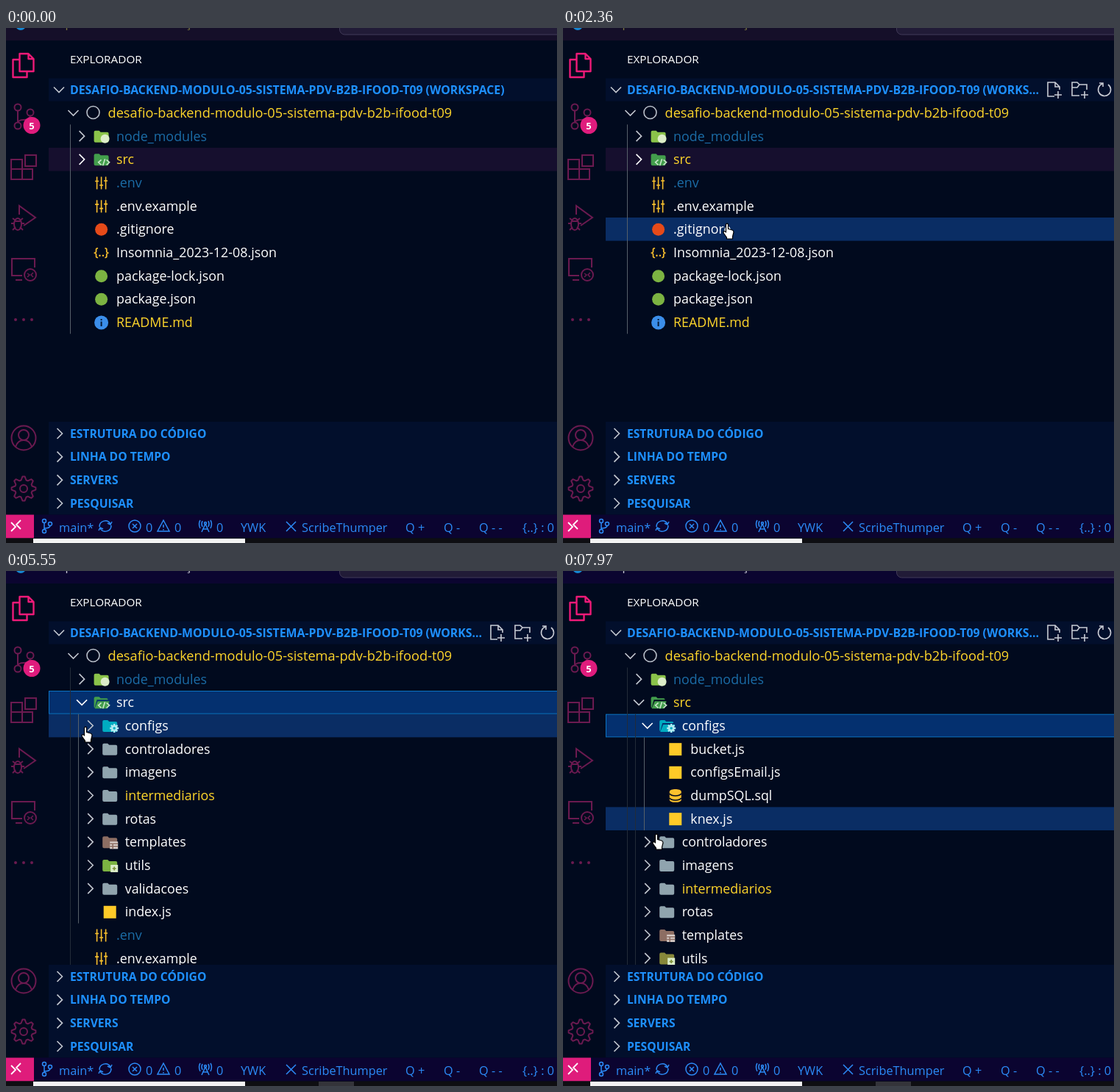
Recreate the animation shown at these times as an HTML page. Size 749 px wide and 701 px high, loop 8 s.

```html
<!DOCTYPE html>
<html lang="pt">
<head>
<meta charset="utf-8">
<title>Explorador</title>
<style>
html, body { margin: 0; width: 100%; height: 100%; overflow: hidden; background: #010a1e; }
svg { display: block; width: 749px; height: 701px; font-family: "Open Sans", "Noto Sans", sans-serif; }
text { white-space: pre; }
.row { font-size: 17.85px; fill: #fff; }
.root { font-size: 18.2px; }
.head { font-size: 15.65px; font-weight: 700; fill: #1e90ff; }
#title { font-size: 15.85px; }
.status { font-size: 16.3px; fill: #2c8cf8; }
.line { fill: none; stroke-width: 1.6; }
.dim { stroke: #6b1a50; stroke-width: 2; fill: none; }
.blue { stroke: #2c8cf8; fill: none; stroke-width: 1.5; }
</style>
</head>
<body>
<svg id="stage" viewBox="0 0 749 701"></svg>
<script>
const LOOP = 8000, TOP = 99.7, ROW = 31.66;
const WHITE = '#fff', YELLOW = '#ffd62b', MUTED = '#1b6ca6', AMBER = '#fbc12d';

const path = (d, attrs = '') => `<path d="${d}" ${attrs}/>`;
const text = (x, y, s, attrs) => `<text x="${x}" y="${y}" ${attrs}>${s}</text>`;
const rect = (x, y, w, h, fill, more = '') => `<rect x="${x}" y="${y}" width="${w}" height="${h}" fill="${fill}" ${more}/>`;
const disc = (x, y, r, attrs) => `<circle cx="${x}" cy="${y}" r="${r}" ${attrs}/>`;
const at = (x, y, body, attrs = '') => `<g transform="translate(${x} ${y})" ${attrs}>${body}</g>`;
const chevron = (x, y, open, color = '#c3c8d0') =>
  at(x, y, path(open ? 'M-7-3.5 0 3.5 7-3.5' : 'M-3.5-7 3.5 0-3.5 7', `class="line" stroke="${color}"`));

// n spokes around the centre, used by gears
const spokes = (n, r1, r2) => Array.from({ length: n }, (_, i) => {
  const a = i * 2 * Math.PI / n, c = Math.cos(a), s = Math.sin(a);
  return `M${(r1 * c).toFixed(1)} ${(r1 * s).toFixed(1)}L${(r2 * c).toFixed(1)} ${(r2 * s).toFixed(1)}`;
}).join('');

const folder = (color, open, mark = '') =>
  path(open ? 'M-10-6q0-2 2-2h5l2 2h8q2 0 2 2H-6L-9 7Q-10 7-10 5ZM-5-2H11L8 8H-9Z'
            : 'M-10-6q0-2 2-2h5l2 2h9q2 0 2 2V6q0 2-2 2H-8q-2 0-2-2Z', `fill="${color}"`) + mark;
const code = path('M0 0l-4 3.5 4 3.5M7 0l4 3.5-4 3.5M5-1l-3 9', 'class="line" stroke="#c8e6c9"');
const gear = at(6, 3, path(spokes(8, 3, 6), 'class="line" stroke="#b2ebf2" style="stroke-width:2.5"') +
  disc(0, 0, 3, 'fill="none" stroke="#b2ebf2" stroke-width="2.5"'));
const grid = rect(0, -1, 11, 10, '#d7ccc8') + path('M0 2H11M0 5.5H11M4 2V9', 'class="line" stroke="#8d6e63"');
const plus = rect(1, -1, 10, 10, '#dcedc8') + path('M6 1.5V6.5M3.5 4H8.5', 'class="line" stroke="#7c8f38"');

const icons = {
  modules: folder('#8bc34a', false, disc(5, 3, 6, 'fill="#dcedc8"')),
  src: folder('#439e4c', false, code),
  srcOpen: folder('#439e4c', true, code),
  configs: folder('#00acc1', false, gear),
  configsOpen: folder('#00acc1', true, gear),
  plain: folder('#90a4ae'),
  templates: folder('#8d6e63', false, grid),
  utils: folder('#7cb342', false, plus),
  utilsDull: folder('#87883a', false, plus),
  env: path('M-6-8.5V8.5M0-8.5V8.5M6-8.5V8.5M-8.5-2.5H-3.5M-2.5 3H2.5M3.5-3H8.5', `class="line" stroke="${AMBER}"`),
  git: disc(0, 0, 8.5, 'fill="#e64a19"'),
  json: text(0, 5, '{..}', `text-anchor="middle" font-size="16" font-weight="600" fill="${AMBER}"`),
  pkg: disc(0, 0, 8.5, 'fill="#7cb342"'),
  info: disc(0, 0, 9.5, 'fill="#3b8eea"') + path('M0-1.5V5M0-5V-3', 'stroke="#061a36" stroke-width="2"'),
  js: rect(-8.5, -8.5, 17, 17, '#ffca28'),
  sql: path('M-8-5.5C-8-10 8-10 8-5.5V5.5C8 10-8 10-8 5.5Z', `fill="${AMBER}"`) +
    path('M-8-3C-5 1 5 1 8-3M-8 3C-5 7 5 7 8 3', 'class="line" stroke="#010a1e"')
};

// entry: depth, icon, label, colour, chevron (0 none, 1 closed, 2 open)
const root = [0, '', 'desafio-backend-modulo-05-sistema-pdv-b2b-ifood-t09', YELLOW, 2];
const modules = [1, 'modules', 'node_modules', MUTED, 1];
const envs = [[1, 'env', '.env', MUTED, 0], [1, 'env', '.env.example', WHITE, 0]];
const dirs = utils => [
  [2, 'plain', 'controladores', WHITE, 1], [2, 'plain', 'imagens', WHITE, 1],
  [2, 'plain', 'intermediarios', YELLOW, 1], [2, 'plain', 'rotas', WHITE, 1],
  [2, 'templates', 'templates', WHITE, 1], [2, utils, 'utils', WHITE, 1]];
const trees = [
  { sel: 2, guides: [[87.5, 1, 10, '#566069']], rows: [
    root, modules, [1, 'src', 'src', YELLOW, 1], ...envs,
    [1, 'git', '.gitignore', WHITE, 0], [1, 'json', 'Insomnia_2023-12-08.json', WHITE, 0],
    [1, 'pkg', 'package-lock.json', WHITE, 0], [1, 'pkg', 'package.json', WHITE, 0],
    [1, 'info', 'README.md', YELLOW, 0]] },
  { sel: 2, guides: [[87.5, 1, 14, '#222b38'], [98.5, 3, 12, '#566069']], rows: [
    root, modules, [1, 'srcOpen', 'src', WHITE, 2], [2, 'configs', 'configs', WHITE, 1],
    ...dirs('utils'), [2, 'plain', 'validacoes', WHITE, 1], [2, 'js', 'index.js', WHITE, 0], ...envs] },
  { sel: 3, guides: [[87.5, 1, 14, '#222b38'], [98.5, 3, 14, '#222b38'], [110.5, 4, 8, '#566069']], rows: [
    root, modules, [1, 'srcOpen', 'src', YELLOW, 2], [2, 'configsOpen', 'configs', WHITE, 2],
    [3, 'js', 'bucket.js', WHITE, 0], [3, 'js', 'configsEmail.js', WHITE, 0],
    [3, 'sql', 'dumpSQL.sql', WHITE, 0], [3, 'js', 'knex.js', WHITE, 0], ...dirs('utilsDull')] }
];

function drawTree(tree, n) {
  const selY = TOP + tree.sel * ROW;
  const select = n ? rect(58.5, selY + .5, 700, ROW - 1, '#04306f', 'stroke="#0b74c4"')
                   : rect(58, selY, 691, ROW, '#160f2e');
  const guides = tree.guides.map(([x, a, b, c]) =>
    path(`M${x} ${TOP + a * ROW}V${TOP + b * ROW}`, `stroke="${c}"`)).join('');
  const rows = tree.rows.map(([depth, icon, label, color, arrow], i) => {
    const y = TOP + (i + .5) * ROW, x = 91.5 + depth * 11.6;
    return (arrow ? chevron(x, y, arrow === 2, i === tree.sel ? WHITE : undefined) : '') +
      (icon ? at(x + 26.5, y + .5, icons[icon]) : disc(118.5, y - .5, 8.5, 'class="line" stroke="#b8bec8"')) +
      text(x + 47, y + 6.5, label, `class="row${depth ? '' : ' root'}" style="fill:${color}"`);
  }).join('');
  return `<g class="tree">${select}${guides}${rows}</g>`;
}

const activity = [
  at(23.5, 51, path('M-5-16H7l7 7V8H-5ZM7-16v7h7M-5-8H-14V16H5V8', 'fill="none" stroke="#ef1a78" stroke-width="2.4" stroke-linejoin="round"')),
  at(24, 120, disc(-8, -12, 4.5, '') + disc(9, -5, 4.5, '') + disc(-8, 13, 4.5, '') + path('M-8-7V8M9 0Q8 5 0 5-7 5-8 9'), 'class="dim"'),
  disc(35, 132.5, 11.5, 'fill="#e01c7d"') + text(35, 137.5, '5', 'text-anchor="middle" font-size="13" font-weight="700" fill="#fff"'),
  at(24, 189, path('M-17-10H-2V17H-17ZM-17 3H12V17H-2M2-16H17V-1H2Z'), 'class="dim"'),
  at(24, 258, path('M-6-4V-16L16 0 0 11M-15 17l4-4M-1 17l-4-4M-17 8h5M-4 8h5M-15 1l4 3M-1 1l-4 3M-12 5h8') +
    `<ellipse cx="-8" cy="9" rx="5" ry="8"/>`, 'class="dim"'),
  at(24, 328, path('M-2 9H-16V-14H15V-2M-11 15H-2') + disc(9, 8, 8, '') + path('M5 6l3 2-3 3M13 5l-3 3 3 3', 'stroke-width="1.5"'), 'class="dim"'),
  [-11, 0, 11].map(d => disc(24 + d, 397, 2, 'fill="#6b1a50"')).join(''),
  at(24, 558, disc(0, 0, 16.5, '') + disc(0, -4, 7, '') + path('M-11 12Q-8 3 0 3T11 12'), 'class="dim"'),
  // cog outline: a ring of teeth traced around the hub
  at(24, 627, path(Array.from({ length: 32 }, (_, i) => {
    const a = (i - .5) * Math.PI / 16, r = i % 4 < 2 ? 16.5 : 12;
    return `${i ? 'L' : 'M'}${(r * Math.cos(a)).toFixed(1)} ${(r * Math.sin(a)).toFixed(1)}`;
  }).join('') + 'Z', 'stroke-linejoin="round"') + disc(0, 0, 5, ''), 'class="dim"')
].join('');

const status = [
  rect(0, 662.5, 749, 32, '#0b0430'), rect(0, 662.5, 38, 32, '#df1c7b'),
  path('M7 673l6 6-6 6M20 670l-6 6 6 6', 'fill="none" stroke="#fff" stroke-width="1.8"'),
  at(56, 678, disc(-4, -7, 2.5, '') + disc(4, -3, 2.5, '') + disc(-4, 7, 2.5, '') + path('M-4-4V4M4 0Q3 3-4 3'), 'class="blue"'),
  at(135, 678, path('M-8 1A8 8 0 0 1 7-3M8-1A8 8 0 0 1-7 3M9-6 7-2 3-4M-9 6-7 2-3 4'), 'class="blue"'),
  at(175, 678, disc(0, 0, 8, '') + path('M-3-3 3 3M3-3-3 3'), 'class="blue"'),
  at(214, 678, path('M0-8 8 7H-8ZM0-2V2M0 4V5.5'), 'class="blue"'),
  at(271, 678, path('M0-3-5 8M0-3 5 8M-3 4H3M-4-7Q-6-3-4 1M4-7Q6-3 4 1M-7-8Q-10-3-7 3M7-8Q10-3 7 3') + disc(0, -4, 1.5, ''), 'class="blue"'),
  path('M381 672l13 13M394 672l-13 13', 'class="blue"'),
  ...[[72, 'main*'], [190, '0'], [229, '0'], [286, '0'], [319, 'YWK'], [402, 'ScribeThumper'], [543, 'Q +'],
    [595, 'Q -'], [643, 'Q - -'], [702, '{..} : 0']].map(([x, s]) => text(x, 685.5, s, 'class="status"')),
  rect(0, 694.5, 749, 7, '#0e0e12'), rect(37, 695, 288, 6, '#f4f4f4'), rect(425, 695, 48, 6, '#34343a', 'id="task"')
].join('');

const header = rect(58, 68.5, 691, 31, '#020f2c') + chevron(72, 84, true) +
  text(87, 90, '', 'class="head" id="title"') +
  `<g id="tools" fill="none" stroke="#c9cbd4" stroke-width="1.6">` +
  path('M668 93H659V74H669L675 80V84M669 74V80H675M673 86V96M668 91H678') +
  path('M702 92H692V74H699L702 77H712V84M692 81H699L702 77M709 86V96M704 91H714') +
  path('M733 76A8.5 8.5 0 1 0 741 77M729 75H734V80') + '</g>';

const panes = rect(58, 536, 691, 126.5, '#020f2c') +
  ['ESTRUTURA DO CÓDIGO', 'LINHA DO TEMPO', 'SERVERS', 'PESQUISAR'].map((s, i) => {
    const y = 552 + i * 31.66;
    return chevron(73, y, false) + text(87, y + 5.8, s, 'class="head"');
  }).join('');

const titleBar = rect(0, 0, 749, 17, '#150f29', 'id="bar"') + disc(20, -4, 7, 'fill="#1688d4"') +
  `<g id="menu" font-size="17">${text(57, -1, 'Arquivo', '')}${text(211, -1, 'Seleção', '')}</g>` +
  rect(453.5, -20, 320, 29, '#211b37', 'rx="7" stroke="#413a58"');

const $ = id => document.getElementById(id);
$('stage').innerHTML = rect(0, 0, 749, 701, '#010a1e') + titleBar + activity +
  text(87, 48, 'EXPLORADOR', 'font-size="15.3" fill="#fff"') +
  `<clipPath id="list"><rect x="58" y="99" width="691" height="437"/></clipPath>
  <g clip-path="url(#list)">${rect(58, 0, 691, ROW, '#0a2d64', 'id="hover"')}${trees.map(drawTree).join('')}</g>` +
  header + panes + status + disc(0, 0, 12, 'id="click" fill="#9a921c" opacity=".92"') +
  `<g id="cursor" fill="#fff" stroke="#000" stroke-width="1.2" stroke-linejoin="round">
  ${path('M0 0V19L4.5 15 8 23.5l3.5-1.5L8 14h6Z', 'id="arrow"')}
  ${path('M-1.5 2C-1.5-.5 1.5-.5 1.5 2V7.5L7 9Q9 9.5 9 12L7.5 18V21H-.5V19L-4.5 13.5C-6 11-3.5 9.5-1.5 12Z', 'id="hand"')}</g>`;
const treeNodes = document.querySelectorAll('.tree');

// pointer moves: start, end, steps, then [step, x, y] waypoints
const moves = [
  [1130, 1260, 3, [[0, 749, 701], [3, 709, 671]]],
  [1740, 2490, 12, [[0, 709, 671], [5, 511, 407], [8, 280, 284], [10, 223, 266], [12, 185, 246]]],
  [2560, 3330, 12, [[0, 185, 246], [5, 132, 208], [9, 107, 181], [12, 101, 173]]],
  [5410, 5620, 4, [[0, 101, 173], [3, 108, 212], [4, 108, 213]]],
  [5820, 5890, 2, [[0, 108, 213], [2, 114, 215]]],
  [7270, 7970, 11, [[0, 114, 215], [5, 131, 262], [11, 127, 358]]]
];

function pointerAt(t) {
  const move = moves.filter(m => t >= m[0]).pop();
  if (!move) return null;
  const [start, end, steps, pts] = move;
  const k = Math.min(steps, 1 + Math.floor((t - start) / (end - start) * (steps - 1) + .01));
  const i = pts.findIndex(p => p[0] >= k), [a, x0, y0] = pts[i - 1], [b, x1, y1] = pts[i];
  const f = (k - a) / (b - a);
  return { x: x0 + (x1 - x0) * f, y: y0 + (y1 - y0) * f };
}

const show = (el, on) => { el.style.display = on ? '' : 'none'; };

function render(t) {
  const n = t < 4740 ? 0 : t < 6260 ? 1 : 2, tree = trees[n];
  const p = pointerAt(t), seen = pointerAt(t - 70); // hover trails the pointer by one step
  const row = seen && seen.y < 536 ? Math.floor((seen.y - TOP) / ROW) : -1;
  const overRow = row >= 0 && row < tree.rows.length;
  const inside = !!seen && seen.y < 662;

  treeNodes.forEach((g, i) => show(g, i === n));
  show($('hover'), overRow && row !== tree.sel);
  $('hover').setAttribute('y', TOP + row * ROW);
  show($('tools'), inside);
  $('title').textContent = 'DESAFIO-BACKEND-MODULO-05-SISTEMA-PDV-B2B-IFOOD-T09 ' + (inside ? '(WORKS…' : '(WORKSPACE)');

  show($('cursor'), p);
  show($('arrow'), !overRow);
  show($('hand'), overRow);
  const clicking = (t >= 4540 && t < 4740) || (t >= 6120 && t < 6260);
  show($('click'), clicking);
  if (p) {
    $('cursor').setAttribute('transform', `translate(${p.x} ${p.y})`);
    $('click').setAttribute('transform', `translate(${p.x - 2} ${p.y + 1})`);
  }

  show($('task'), n);
  $('bar').setAttribute('fill', n ? '#0b0530' : '#150f29');
  $('menu').setAttribute('fill', n ? '#c9c9d6' : '#7b7740');
}

let begin;
function tick(now) {
  begin ??= now;
  render((now - begin) % LOOP);
  requestAnimationFrame(tick);
}
render(0);
requestAnimationFrame(tick);
</script>
</body>
</html>
```
